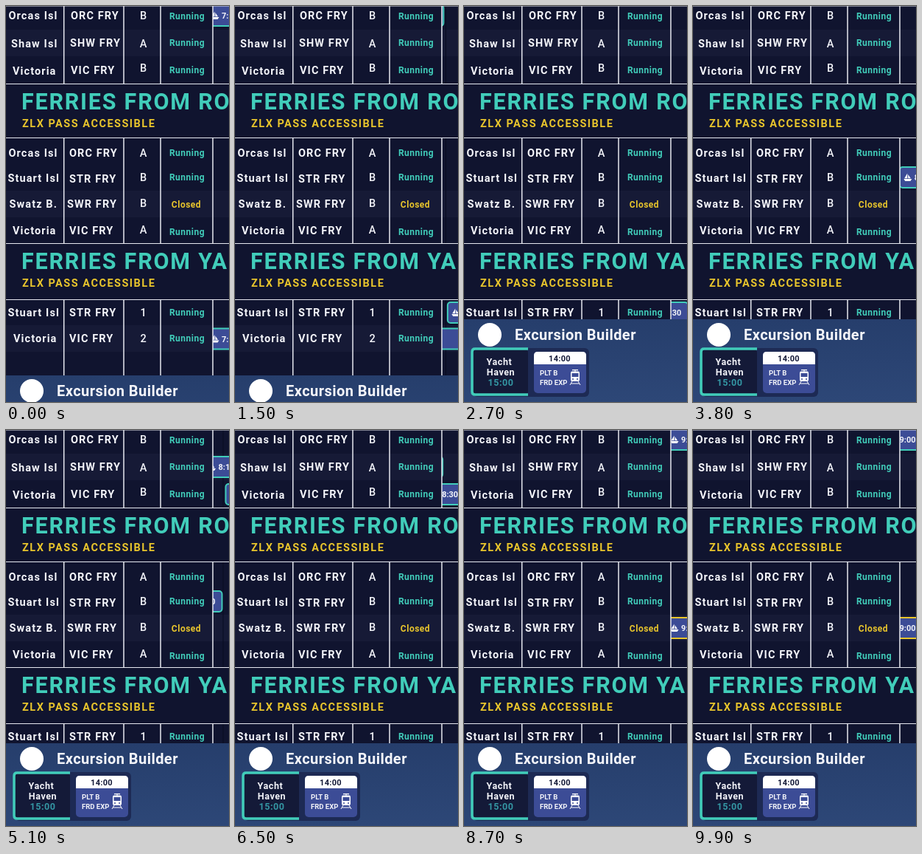
These frames come from a looping animation (303x536 px, 10 s). An HTML page:

```html
<!DOCTYPE html>
<html lang="en">
<head>
<meta charset="utf-8">
<title>Ferry board</title>
<style>
  html, body { margin: 0; width: 100%; height: 100%; overflow: hidden; background: #10142f; }
  svg { display: block; width: 303px; height: 536px; }
  text { font-family: Roboto, Arial, sans-serif; font-weight: 700; fill: #f4f5fa; }
  .cell { font-size: 14.5px; letter-spacing: 1.1px; }
  .dock { font-size: 14.5px; font-weight: 500; text-anchor: middle; }
  .status { font-size: 12px; letter-spacing: .5px; text-anchor: middle; }
  .head { font-size: 30.5px; letter-spacing: 1.8px; }
  .sub { font-size: 14.5px; letter-spacing: 1.5px; }
  .time { font-size: 11px; }
  .stop { font-size: 12.5px; letter-spacing: .6px; text-anchor: middle; }
  .note { font-size: 9.5px; }
  .teal { fill: #41cdba; }
  .dim { fill: #3497a4; }
  .yellow { fill: #e8c52c; }
</style>
</head>
<body>
<svg viewBox="0 0 303 536">
  <defs>
    <clipPath id="lane"><rect x="281" width="22" height="536"/></clipPath>
    <linearGradient id="sky" x2="0" y2="1">
      <stop stop-color="#263e6c"/><stop offset="1" stop-color="#2d4777"/>
    </linearGradient>
    <path id="boat" fill="#fff" d="M-.6-5.5V1.2H-4.6ZM.4-4 4 1.2H.4ZM-5.5 2H5.5L3.6 5H-3.6Z"/>
  </defs>
  <rect width="303" height="536" fill="#10142f"/>
  <g id="board"></g>
  <g clip-path="url(#lane)"><g id="cards"></g></g>
  <g id="lines" stroke="#e6e8f0"></g>
  <g id="panel">
    <rect y="424" width="303" height="112" fill="url(#sky)"/>
    <circle cx="35" cy="445" r="16" fill="#fff"/>
    <text x="69" y="452" font-size="20" letter-spacing=".45">Excursion Builder</text>
    <rect x="12" y="463" width="158" height="66" rx="6" fill="#1d2a54"/>
    <rect x="10" y="464" width="77" height="63" rx="5" fill="#141a38"/>
    <path d="M87 464H15Q11 464 11 468V522Q11 526 15 526H87" fill="none" stroke="#41cdba" stroke-width="3.5"/>
    <text class="stop" x="48" y="486">Yacht</text>
    <text class="stop" x="50" y="500">Haven</text>
    <text class="stop dim" x="50" y="514">15:00</text>
    <rect x="95" y="468" width="71" height="56" rx="5" fill="#3c4c96"/>
    <path d="M95 485V473Q95 468 100 468H161Q166 468 166 473V485Z" fill="#fff"/>
    <text x="130" y="481" font-size="11" letter-spacing=".3" text-anchor="middle" style="fill:#141a38">14:00</text>
    <text class="note" x="103" y="500">PLT B</text>
    <text class="note" x="103" y="512.5">FRD EXP</text>
    <g fill="#fff">
      <path d="M147 492H155V493.200H147ZM150.500 493H151.500V495H150.500Z"/>
      <rect x="145" y="494.500" width="12" height="13.500" rx="2"/>
      <path d="M147 508 144 513M155 508 158 513M145.500 511H156.500" stroke="#fff"/>
      <path d="M146.500 497H155.500V502H146.500Z" fill="#3c4c96"/>
      <circle cx="148" cy="505" r="1" fill="#3c4c96"/>
      <circle cx="154" cy="505" r="1" fill="#3c4c96"/>
    </g>
  </g>
</svg>
<script>
const $ = id => document.getElementById(id);
const text = (cls, x, y, s) => `<text class="${cls}" x="${x}" y="${y}">${s}</text>`;
const band = y => `<rect y="${y}" width="303" height="36" fill="#161a36"/>`;

// name, x, y, code, x, y, dock, y, status y
const rows = [
  ['Orcas Isl', 3.5, 18, 'ORC FRY', 88, 18, 'B', 18, 18],
  ['Shaw Isl', 7, 56, 'SHW FRY', 87, 55, 'A', 56, 54],
  ['Victoria', 9, 92.5, 'VIC FRY', 88, 92, 'B', 89, 91],
  ['Orcas Isl', 3.5, 203.5, 'ORC FRY', 86, 204, 'A', 203.5, 203],
  ['Stuart Isl', 2.5, 238, 'STR FRY', 86, 239, 'B', 237, 236],
  ['Swatz B.', 4.5, 273, 'SWR FRY', 83, 273, 'B', 272, 273],
  ['Victoria', 9, 308.5, 'VIC FRY', 86, 309, 'A', 308, 309.5],
  ['Stuart Isl', 2.5, 420, 'STR FRY', 86, 420, '1', 420, 419],
  ['Victoria', 10, 454.5, 'VIC FRY', 86, 455, '2', 454.5, 453.5]
];
const heading = (y, port) =>
  text('head teal', 21, y, 'FERRIES FROM ' + port) + text('sub yellow', 22, y + 24, 'ZLX PASS ACCESSIBLE');

$('board').innerHTML =
  [32, 250, 432].map(band).join('') +
  rows.map(([name, nx, ny, code, cx, cy, dock, dy, sy]) => {
    const closed = name === 'Swatz B.';
    return text('cell', nx, ny, name) + text('cell', cx, cy, code) + text('dock', 186.5, dy, dock) +
      text('status ' + (closed ? 'yellow' : 'teal'), closed ? 245 : 246, sy, closed ? 'Closed' : 'Running');
  }).join('') +
  heading(140, 'ROCHE') + heading(356, 'YACHT');

const tables = [[0, 105.5], [178.5, 321.5], [397.5, 536]];
const columns = xs => tables.map(([a, b]) => xs.map(x => `M${x} ${a}V${b}`).join('')).join('');
$('lines').innerHTML = `<path d="${columns([78.7, 160, 210, 281])}" stroke-width="1.500"/>` +
  `<path d="${tables.map(([a, b]) => `M0 ${a}H303M0 ${b}H303`).join('')}"/>`;

// left edge at the start, row centre, departure, width, border
const card = (x, y, time, w = 53, edge = '#41cdba') =>
  `<g transform="translate(${x} ${y})">
    <rect x="1" y="-14" width="${w - 2}" height="28" rx="4" fill="#3c4c96" stroke="${edge}" stroke-width="2"/>
    <use href="#boat" x="12"/>${text('time', 21, 4, time)}</g>`;
const halfHours = [0, 1, 2, 3, 4, 5].map(i => 269 + 58 * i);
$('cards').innerHTML = `<path d="${columns(halfHours)}" stroke="#090c20"/>` + [
  card(272, 13, '7:00'), card(272, 450.5, '7:00', 110),
  card(328.5, 415, '7:30'), card(389.5, 232, '8:00'),
  card(415.5, 50, '8:15'), card(445.5, 87, '8:30'),
  card(504, 13, '9:00'), card(504, 268, '9:00', 53, '#e8c52c')
].join('');

const scroll = s => 160 * (Math.sin((s - 3.2) / 5.26) + Math.sin(3.2 / 5.26));
const smooth = u => { u = Math.min(1, Math.max(0, u)); return u * u * (3 - 2 * u); };

function draw(now) {
  const s = Math.floor(now % 10000 / 100) / 10;
  $('cards').setAttribute('transform', `translate(${-scroll(s)} 0)`);
  $('panel').setAttribute('transform', `translate(0 ${76 * (1 - smooth((s - 2) / .5))})`);
}
const start = performance.now();
const tick = () => { draw(performance.now() - start); requestAnimationFrame(tick); };
tick();
</script>
</body>
</html>
```
